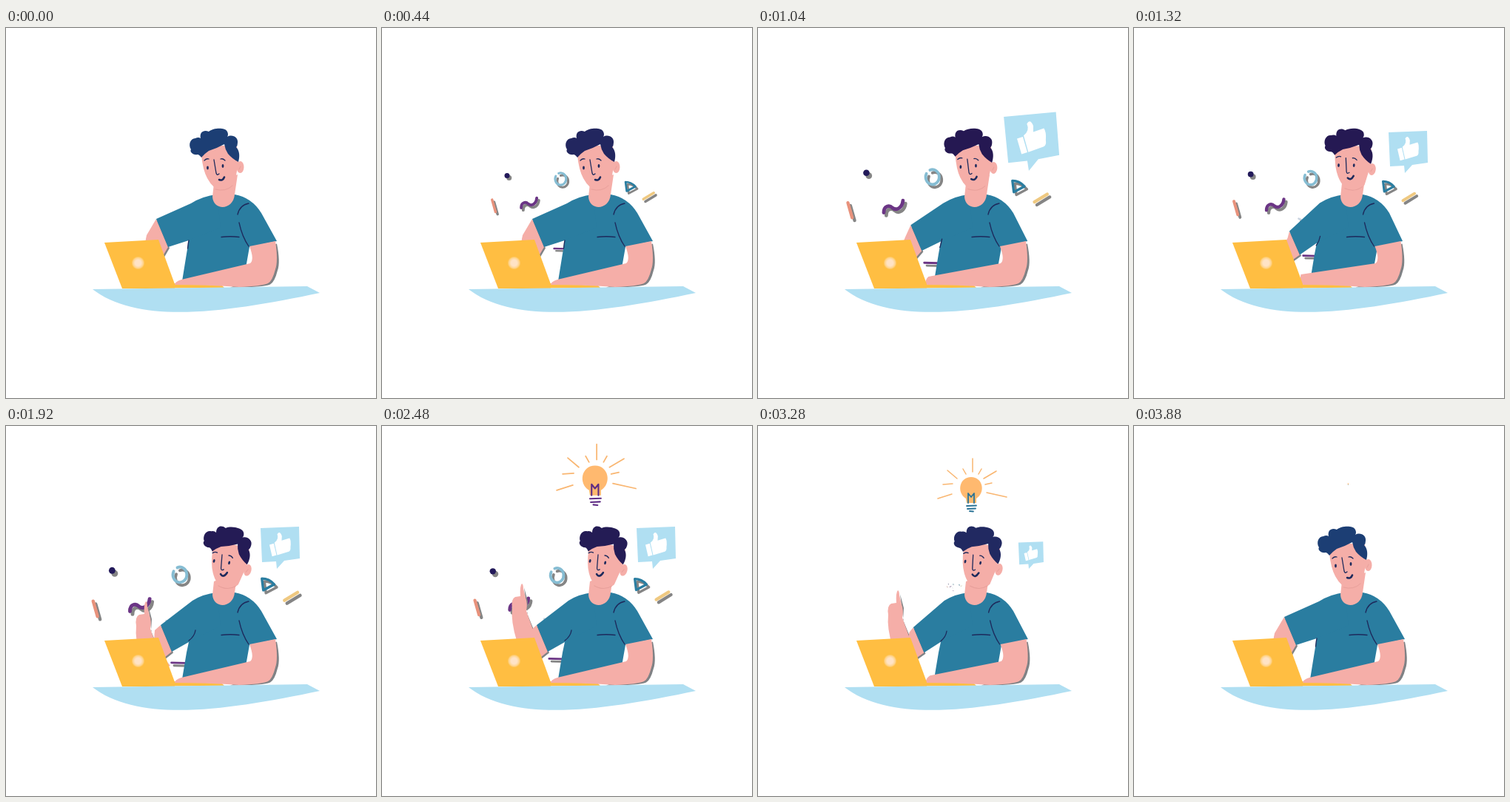
An HTML page that plays this animation: 500x500 px, repeating every 3920 ms.

```html
<!DOCTYPE html>
<html lang="en">
<head>
<meta charset="utf-8">
<title>Idea at the desk</title>
<style>
  html, body { margin: 0; width: 100%; height: 100%; overflow: hidden; background: #fff; }
  svg { display: block; width: 100vw; height: 100vh; }
  .line { fill: none; stroke-linecap: round; stroke-linejoin: round; }
  .ink { stroke: #1d2a5c; }
  .skin { fill: #f5aea8; }
  .shirt { fill: #2a7da0; }
  .shade { fill: #808285; }
</style>
</head>
<body>
<svg viewBox="0 0 500 500">
  <defs>
    <radialGradient id="glow">
      <stop offset=".45" stop-color="#ffe3c6"/>
      <stop offset=".75" stop-color="#ffd692"/>
      <stop offset="1" stop-color="#ffbe42"/>
    </radialGradient>
    <clipPath id="aboveDesk"><rect width="500" height="350"/></clipPath>
  </defs>

  <g id="props"></g>

  <g id="bubble">
    <path fill="#b0dff2" d="M344 138L396 136L397 179L376 182L366 193L365 183L346 184Z"/>
    <path fill="#fff" transform="rotate(-6 370 160)" d="M356 159L362 158L364 174L358 175ZM363 157Q370 153 368 146Q372 141 374 149L373 155L384 153Q386 157 384 165Q384 170 381 171L365 174Z"/>
  </g>

  <g id="bulb" class="line">
    <path fill="#ffb96f" d="M282 104L281 98C268 90 272 69 288 69C304 69 308 90 295 98L295 104Z"/>
    <path id="filament" stroke-width="1.8" d="M284 104V91L288 96L292 91V104M282 108L295 107.500M283 112L294 111.500M286 115L291 115.500"/>
    <path stroke="#f9b671" stroke-width="1.500" d="M290 44V62M256 60L269 71M322 61L305 71M277 58L281 65M302 58L298 65M250 79L263 78M307 79L316 77M243 98L262 92M309 90L336 96"/>
  </g>

  <g clip-path="url(#aboveDesk)">
    <g id="hand">
      <path class="shade" transform="translate(3 3)" d="M189 215L194 234L193 250L204 277L198 285Z"/>
      <path class="skin" d="M189 213Q191 214 191 220L194 232Q197 240 195 250L205 278L222 300L206 306L182 290Q174 264 176 246Q174 234 180 231L187 230Q186 216 189 213Z"/>
    </g>
  </g>
  <path id="stubShade" class="shade" transform="translate(2 1.500)"/>
  <path id="stub" class="skin"/>

  <path id="torso" class="shirt"/>
  <path id="sleeve" class="shirt"/>
  <path id="armpit" class="line ink" stroke-width="1.300"/>
  <path class="skin" d="M281 210L279 228C280 247 307 247 309 225L313 198Z"/>

  <g id="head">
    <ellipse class="skin" cx="316.500" cy="188" rx="5" ry="8"/>
    <path class="skin" d="M264 172Q266 192 272 203Q280 218 291 219Q304 218 309 210L314 182L312 160L275 158Z"/>
    <path class="line" stroke="#e8a09b" d="M283 218Q297 222 306 213M315 191L317 187"/>
    <path id="hair" d="M264 175Q261 171 259 171C252 172 248 167 250 164C246 158 249 149 256 149Q260 147 263 149C261 140 268 137 274 140C280 135 296 134 299 140Q301 144 299 147C306 143 314 148 313 155Q313 159 311 161C316 166 316 174 314 181Q306 177 300 170Q296 164 295 157Q284 163 274 166Q268 170 264 175Z"/>
    <g id="face">
      <g fill="#1d2a5c">
        <ellipse cx="272.500" cy="189" rx="1.400" ry="2.400"/>
        <ellipse cx="293" cy="186.500" rx="1.400" ry="2.400"/>
      </g>
      <path class="line ink" stroke-width="1.300" d="M268 179Q271 176 274 177M290 177Q293 176 296 179M281 178L284 196Q285 200 288 197"/>
      <path id="mouth" class="line ink" stroke-width="2.600"/>
    </g>
  </g>

  <path fill="#ffbe42" d="M157 352L225 345L292 348L295 351Z"/>
  <g id="arm">
    <path class="line ink" stroke-width="1.300" d="M313 252Q316 239 328 237M315 263Q319 282 328 295M291 282.500Q303 281 315 282.500"/>
    <path class="shade" transform="translate(3 1.500)" d="M345 296L363 290Q368 315 364 326Q360 342 354 345Q345 349 300 349L340 335Z"/>
    <path id="forearm" class="skin"/>
  </g>
  <path fill="#ffbe42" d="M133 290L206 286L228 346V352H157Z"/>
  <circle cx="178.500" cy="317.500" r="9" fill="url(#glow)"/>
  <path fill="#b0dff2" d="M117 353L407 349L424 358C300 384 180 402 117 353Z"/>
</svg>
<script>
const LOOP = 3920;
const el = id => document.getElementById(id);
const set = (id, name, value) => el(id).setAttribute(name, value);
const lerp = (a, b, k) => a + (b - a) * k;

// Eased value at time t from alternating times and values.
function at(t, ...keys) {
  if (t <= keys[0]) return keys[1];
  for (let i = 2; i < keys.length; i += 2) {
    if (t < keys[i]) {
      const k = (t - keys[i - 2]) / (keys[i] - keys[i - 2]);
      return lerp(keys[i - 1], keys[i + 1], k * k * (3 - 2 * k));
    }
  }
  return keys[keys.length - 1];
}

const scaleAbout = (x, y, s) => `translate(${x} ${y}) scale(${s}) translate(${-x} ${-y})`;

// Floating doodles: path, colour, width.
const doodles = [
  ["M141.500 195h.01", "#231a5a", 9],
  ["M115.500 237L121.500 258", "#e8927c", 4.5],
  ["M166 251C166 241 174 240 178 244C184 249 192 244 193 234", "#6b3585", 5],
  ["M231 191A9.500 10.500 0 1 1 226 196", "#86bdd3", 4],
  ["M347 206L349 222L364 214Q357 206 347 206Z", "#2a7da0", 3.5],
  ["M378 236L396 225", "#efc981", 4.500],
  ["M223 321.500L243 322", "#6b3585", 3],
  ["M216 264L222 267", "#c9d3e0", 3]
];
el("props").innerHTML = doodles.map(([d, color, width]) =>
  `<g class="line" stroke-width="${width}">
    <path stroke="#858585" transform="translate(3.500 4)" d="${d}"/>
    <path stroke="${color}" d="${d}"/>
  </g>`).join("");

function drawBody(t) {
  const pose = at(t, 720, 0, 1920, 1, 3140, 1, 3820, 0);
  const dip = 4 * pose * (1 - pose);
  const point = (x1, y1, x2, y2, dx = 0, dy = 0) =>
    `${lerp(x1, x2, pose) + dx * dip} ${lerp(y1, y2, pose) + dy * dip}`;

  const cuffTop = point(203, 258, 209, 269, 4, 11);
  const cuffEnd = point(219, 296, 224, 305, 2.5, 6);
  const pit = point(247, 287, 247, 292, 0, 1);
  const side = point(244, 305, 244, 306);
  const wrist = point(190, 280, 201, 276, 12, 6);

  set("sleeve", "d", `M285 225Q266 227 ${point(250, 237, 252, 236)}L${cuffTop}L${cuffEnd}L${pit}L290 270Z`);
  set("torso", "d", `M280 226L309 225Q332 229 345 250L${366 - 3 * dip} 288L329 296L324 324L238 342L${side}L${pit}L270 240Z`);
  set("armpit", "d", `M${point(245.5, 298, 247, 290)}Q${point(246, 292, 255, 284)} ${point(247, 287, 256, 276)}`);
  const stub = `M${cuffTop}L${wrist}L${point(188, 290, 200, 290, 10, 0)}L205 320L${cuffEnd}Z`;
  set("stub", "d", stub);
  set("stubShade", "d", stub);

  set("head", "transform", `rotate(${14 * pose} 294 232)`);
  set("face", "transform", `translate(${-3 * pose} ${-2 * pose})`);
  set("mouth", "d", `M${point(288, 205, 285.5, 204)}Q${point(293, 207, 290, 209)} ${point(295, 201.5, 293.5, 200)}`);
  set("arm", "transform", `translate(${-3.5 * dip} 0)`);
  set("forearm", "d", `M329 295L364 288Q368 315 364 326Q360 342 354 345Q345 349 315 350
    Q275 347 228 347Q228 ${343 - 6 * dip} ${237 - 8 * dip} ${340 - 7 * dip}L330 318Q336 313 329 295Z`);

  const tint = at(t, 0, 0, 760, 1, 2480, .9, 3280, .55, 3880, 0);
  const rgb = [[28, 37], [62, 24], [116, 82]].map(([a, b]) => Math.round(lerp(a, b, tint)));
  set("hair", "fill", `rgb(${rgb})`);

  set("hand", "transform", `translate(0 ${at(t, 1460, 85, 2170, 0, 3160, 0, 3760, 85)})`);
}

function drawExtras(t) {
  const breathe = .94 - .07 * Math.cos((t - 1320) / 940 * 2 * Math.PI);
  const pop = at(t, 160, 0, 560, 1.13, 860, 1, 3000, 1, 3340, 0);
  set("props", "transform", scaleAbout(266, 215, breathe * pop));

  const bubble = at(t, 620, 0, 1040, 1.36, 1320, 1, 3160, 1, 3460, 0);
  const tilt = at(t, 640, -30, 1140, 0);
  const settle = at(t, 1040, 0, 1320, 3, 1640, 0);
  set("bubble", "transform", `translate(0 ${settle}) rotate(${tilt} 366 193) ${scaleAbout(366, 193, bubble)}`);

  const rise = at(t, 1990, 0, 2365, 1.28, 2610, 1);
  const shrink = at(t, 3500, 1, 3940, 0);
  set("bulb", "transform", `${scaleAbout(289.5, 78, shrink)} ${scaleAbout(289, 172, rise)}`);
  set("filament", "stroke", t < 2880 ? "#5f2d85" : "#2a7396");
}

function frame(now) {
  const t = now % LOOP;
  drawBody(t);
  drawExtras(t);
  requestAnimationFrame(frame);
}
requestAnimationFrame(frame);
</script>
</body>
</html>
```
